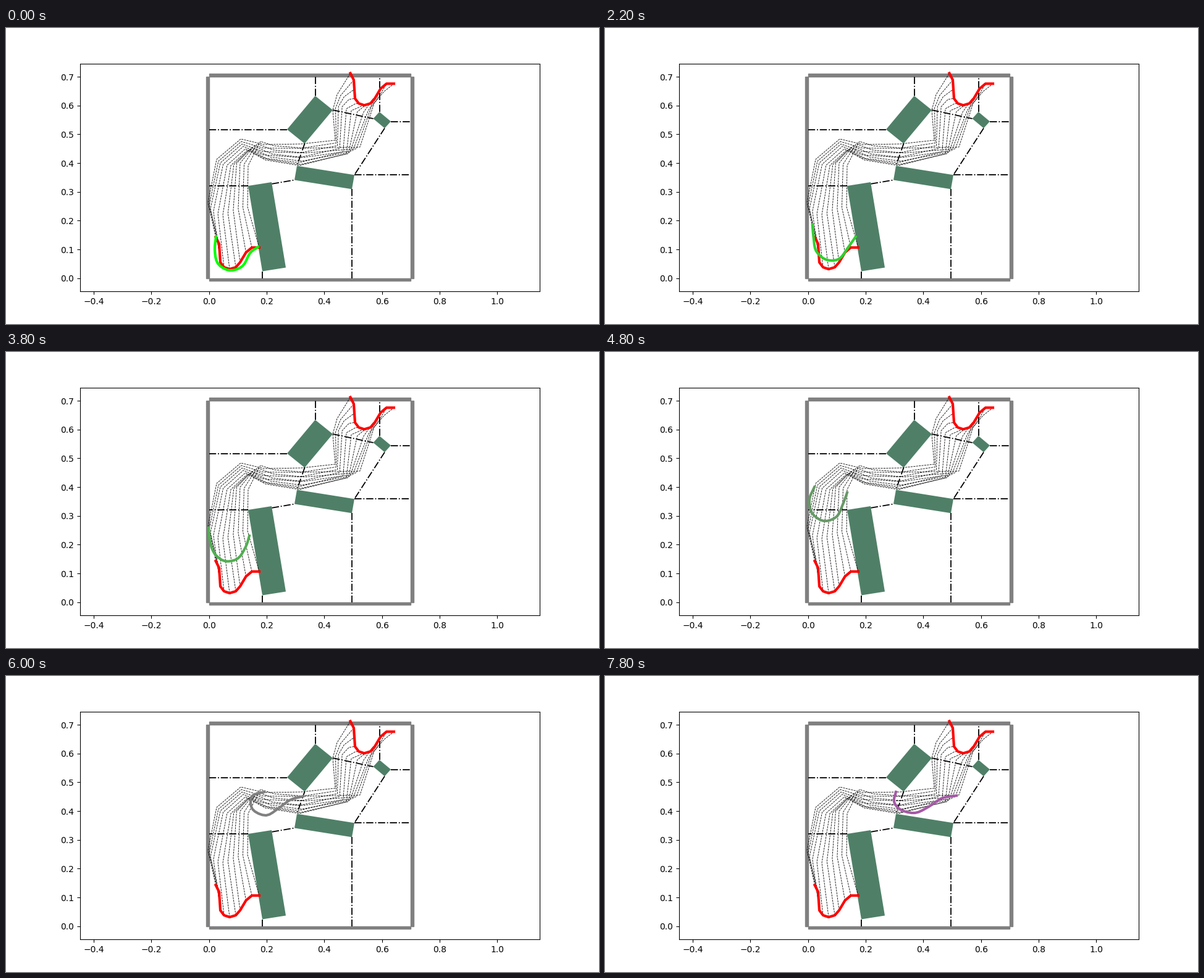
Animation, 960 px wide and 480 px high, one loop 8 s. Source, as a matplotlib script:

```python
import numpy as np
import matplotlib.pyplot as plt
from matplotlib.animation import FuncAnimation
from matplotlib.patches import Polygon, Rectangle

SCALE, X0, Y0 = 466.67, 328.67, 405.73   # pixels per unit, pixel of the axes' zero
SIDE = 0.7                               # side of the square room
FRAMES = 40


def data(points):
    """Convert stage pixels (y down) to axes units."""
    p = np.asarray(points, float)
    return np.column_stack([(p[:, 0] - X0) / SCALE, (Y0 - p[:, 1]) / SCALE])


def spline(points, n):
    """Sample a Catmull-Rom curve through the points n times."""
    p = np.asarray(points, float)
    p = np.vstack([2 * p[0] - p[1], p, 2 * p[-1] - p[-2]])
    u = np.linspace(0, len(p) - 3, n)
    i = np.minimum(u.astype(int), len(p) - 4)
    t = (u - i)[:, None]
    a, b, c, d = (p[i + k] for k in range(4))
    return 0.5 * (2 * b + (c - a) * t + (2 * a - 5 * b + 4 * c - d) * t**2
                  + (3 * b - a - 3 * c + d) * t**3)


def box(a, b, d):
    """Corners of a parallelogram from a corner and its two neighbours."""
    a, b, d = map(np.array, (a, b, d))
    return data([a, b, b + d - a, d])


# Fixed rope shape, used at the start and, shifted, at the goal
start = np.array([(339.5, 339), (345, 350), (346, 365), (347, 380), (353, 388),
                  (362, 391), (372, 388), (379, 380), (388.5, 364),
                  (398, 356), (410, 356)])
goal = start + (218, -265.7)

# Waypoints of the planned paths, each a coarse rope shape
waypoints = [
    [(327, 283), (333, 295), (351, 303), (372, 294), (391, 290)],
    [(341, 213), (349, 220), (364, 223), (376, 219), (392, 223)],
    [(380, 180), (383, 190), (391, 198), (399, 193), (412, 184)],
    [(418, 189), (416, 203), (420, 214), (430, 207), (434, 191)],
    [(478, 188), (475, 206), (475, 223), (480, 213), (486, 195)],
    [(533, 182), (538, 193), (551, 204), (559, 200), (573, 193)],
    [(529, 133), (541, 127), (559, 134), (583, 136), (596, 122)],
    [(536, 108), (551, 113), (575, 127), (598, 112), (612, 103)],
]

# Key poses of the moving rope
low = [(340, 338), (338, 360), (343, 382), (362, 393), (383, 386), (395, 365), (408, 355)]
lifted = np.array([(336, 321), (338, 342), (342, 363), (358, 377),
                   (379, 376), (394, 357), (406, 340)])
raised = lifted + (-1.6, -9)
gate = [(328, 285), (330, 305), (337, 326), (354, 339), (375, 335), (388, 316), (394, 298)]
above = [(339, 219), (331, 239), (335, 261), (354, 274), (375, 267), (385, 247), (392, 228)]
bend = [(377, 183), (363, 199), (366, 221), (385, 233), (405, 223), (415, 205), (424, 189)]
turned = [(418, 188), (398, 195), (399, 216), (421, 226), (442, 214), (460, 201), (481, 195)]
across = [(471, 188), (468, 204), (479, 217), (502, 222), (524, 212), (546, 198), (569, 194)]
poses = np.array([spline(p, 25) for p in
                  (low, lifted, raised, gate, above, bend, turned, across)])
key_frames = [0, 7, 12, 15, 18, 19, 24, 27, 30, 36, 39]
key_poses = [0, 1, 1.2, 2, 2.66, 3, 4, 5, 6, 6.81, 7]

big = box((500.5, 110), (529, 133), (455, 164.5))
small = box((604.5, 136), (623, 151.5), (594.5, 147))
flat = box((471, 223.5), (564, 238.3), (467, 246.5))
tall = box((392, 256), (430, 250), (415, 394.5))
tall_side = tall[1] + (tall[2] - tall[1]) * 0.02

# Passages: corner to corner, or straight from a corner to a wall
passages = [(big[1], small[3]), (small[2], flat[1]),
            (big[2], flat[0]), (tall_side, flat[3])]
passages += [(c, (c[0], SIDE)) for c in (big[0], small[0])]
passages += [(c, (c[0], 0)) for c in (tall[3], flat[2])]
passages += [(c, (0, c[1])) for c in (big[3], tall[0])]
passages += [(c, (SIDE, c[1])) for c in (small[1], flat[1])]

fig, ax = plt.subplots(figsize=(9.6, 4.8), dpi=100)
ax.set_xlim((120 - X0) / SCALE, (864 - X0) / SCALE)
ax.set_ylim((Y0 - 427.2) / SCALE, (Y0 - 57.6) / SCALE)

for edge in (-0.01, SIDE):
    ax.add_patch(Rectangle((edge, 0), 0.01, SIDE, color="gray"))
    ax.add_patch(Rectangle((0, edge), SIDE, 0.01, color="gray"))
for corners in (big, small, flat, tall):
    ax.add_patch(Polygon(corners, facecolor="#4f8067", edgecolor="none"))
for ends in passages:
    ax.plot(*np.array(ends).T, "k-.", lw=1.3)

stages = [start] + [spline(w, len(start)) for w in waypoints] + [goal]
for path in np.stack(stages, axis=1):
    ax.plot(*data(path).T, "k--", lw=0.6)
for shape in (start, goal):
    ax.plot(*data(shape).T, color="red", lw=3)
rope, = ax.plot([], [], lw=3)


def update(frame):
    k = np.interp(frame, key_frames, key_poses)
    i = min(int(k), len(poses) - 2)
    pose = poses[i] + (poses[i + 1] - poses[i]) * (k - i)
    rope.set_data(*data(pose).T)
    c = frame / 60
    rope.set_color((c, 1 - c, c))
    return rope,


anim = FuncAnimation(fig, update, frames=FRAMES, interval=200, repeat=True)
plt.show()
```
